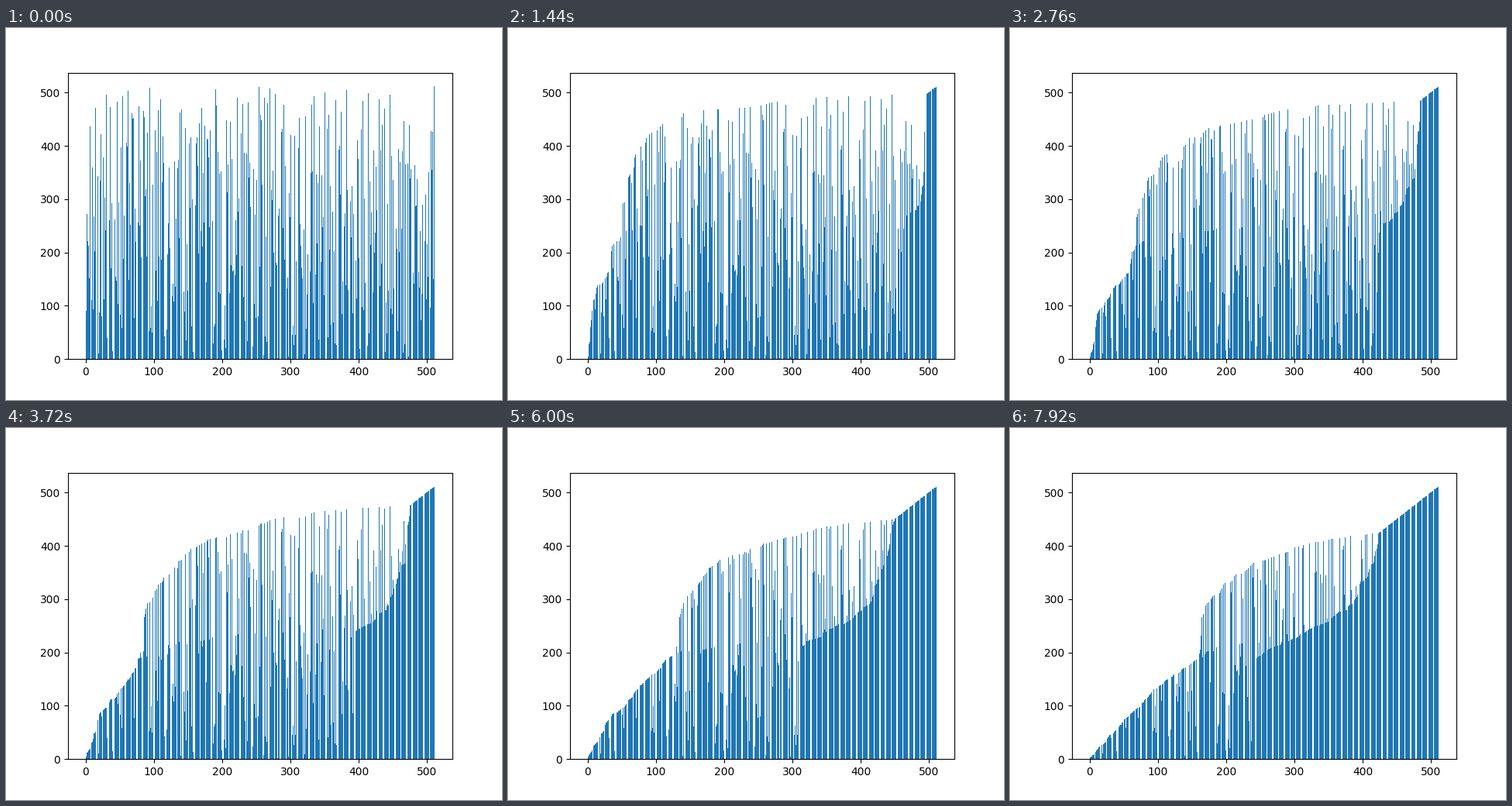
A matplotlib script that plays this animation: 640x480 px, repeating every 8 s.

```python
import numpy as np
import matplotlib.pyplot as plt
from matplotlib.animation import FuncAnimation
from matplotlib.collections import PolyCollection

N = 512
STEPS = 67          # distinct states in one loop
HOLD = 3            # ticks of 40 ms per state


def start_values():
    """Shuffle 1..N, then let the larger bar win at the end of each block."""
    a = [int(v) + 1 for v in np.random.default_rng(7).permutation(N)]
    for gap in 2 ** np.arange(9):
        for i in range(2 * gap - 2, N, 2 * gap):
            if i >= gap and a[i - gap] > a[i]:
                a[i - gap], a[i] = a[i], a[i - gap]
    return a


def push_up(a, cur, end, cap=N + 1):
    """Carry cur rightwards, trading it for each larger bar below cap."""
    for j in range(end):
        if cur < a[j] < cap:
            a[j], cur = cur, a[j]
    return cur


def push_down(a, cur, start, end):
    """Carry cur leftwards, trading it for each smaller bar."""
    for j in range(start, end - 1, -1):
        if a[j] < cur:
            a[j], cur = cur, a[j]
    return cur


def sort_states():
    a = start_values()
    states = [a.copy()]
    front = knee = N - 1
    for k in range(1, STEPS):
        new_knee = int(N - 1 - 3.5 * k - 0.009 * k * k)
        cap = 285 - 1.45 * k
        lows = [x for x in range(knee - 1, new_knee - 1, -1)
                if x < front and a[x] < cap]
        knee = new_knee
        # the largest remaining bar goes to the sorted end
        while front > N - 3 - int(1.12 * k):
            end = lows.pop(0) if lows else knee
            cur = push_down(a, a[front], front - 1, end)
            a[front] = push_up(a, cur, front)
            front -= 1
        # low bars left over are swapped for the largest below the cap
        for x in lows:
            a[x] = push_up(a, a[x], x, cap)
        states.append(a.copy())
    return states


def bar_shapes(heights):
    x = np.arange(N)
    h = np.asarray(heights, float)
    left, right, zero = x - 0.4, x + 0.4, np.zeros(N)
    return np.stack([
        np.column_stack([left, zero]), np.column_stack([right, zero]),
        np.column_stack([right, h]), np.column_stack([left, h]),
    ], axis=1)


states = sort_states()
fig, ax = plt.subplots(figsize=(6.4, 4.8), dpi=100)
margin = 0.05 * (N - 0.2)
ax.set_xlim(-0.4 - margin, N - 0.6 + margin)
ax.set_ylim(0, 1.05 * N)
bars = PolyCollection(bar_shapes(states[0]), facecolors="C0",
                      edgecolors="none", linewidths=0)
ax.add_collection(bars, autolim=False)


def update(tick):
    bars.set_verts(bar_shapes(states[tick // HOLD]))
    return (bars,)


anim = FuncAnimation(fig, update, frames=200, interval=40,
                     repeat=True, repeat_delay=0)
plt.show()
```
